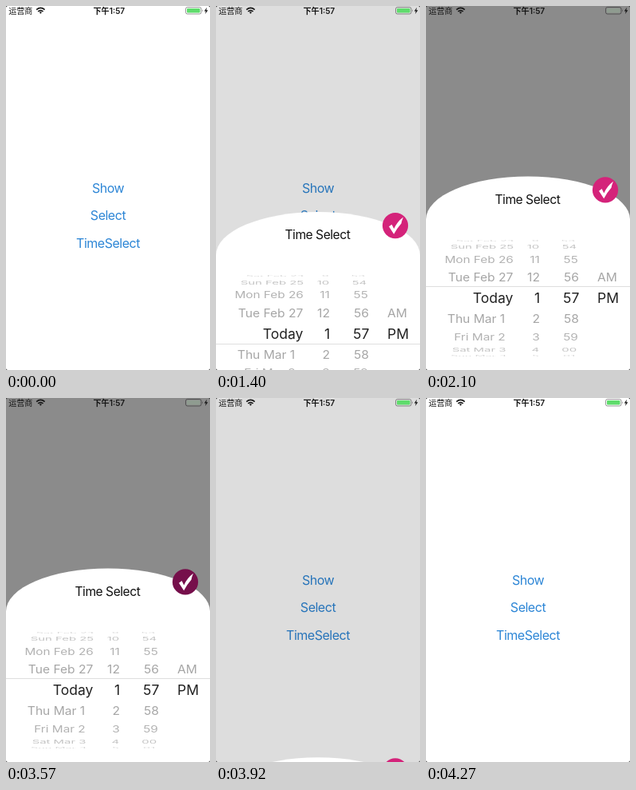
Write an HTML page that moves like this. It is 256 by 456 pixels and loops after 4.83 s.

```html
<!DOCTYPE html>
<html lang="zh">
<head>
<meta charset="utf-8">
<title>Time picker sheet</title>
<style>
  html, body { margin: 0; width: 100%; height: 100%; overflow: hidden; background: #fff; }
  svg { display: block; width: 100%; height: 100%; }
  text { font-family: Inter, Roboto, sans-serif; }
  .link { font-size: 16px; letter-spacing: -0.03em; fill: #2d86d6; text-anchor: middle; }
  .title { font-size: 15.6px; letter-spacing: -0.03em; fill: #111; text-anchor: middle; }
  .status { font: 400 10.1px Inter, "Noto Sans CJK SC", "Noto Sans CJK", sans-serif; fill: #161616; }
  .clock { font-weight: 600; text-anchor: middle; }
  .row { font-size: 15.7px; fill: #a2a2a2; text-anchor: end; }
  .row.now { font-size: 17.5px; fill: #222; }
</style>
</head>
<body>
<svg viewBox="0 0 256 456">
  <rect width="256" height="456" fill="#fff"/>
  <text class="link" x="128" y="233.5">Show</text>
  <text class="link" x="128" y="268">Select</text>
  <text class="link" x="128" y="303" id="open">TimeSelect</text>
  <rect id="dim" width="256" height="456"/>

  <g id="sheet">
    <path d="M0 267.3A128 53.9 0 0 1 256 267.3V456H0Z" fill="#fff"/>
    <text class="title" x="127.4" y="247.8">Time Select</text>
    <g id="wheel"></g>
    <path id="lineTop" d="M0 351.5H256" stroke="#dedede"/>
    <path id="lineLow" d="M0 378.9H256" stroke="#dedede"/>
    <circle id="done" cx="225" cy="230.4" r="16.1"/>
    <path d="M217 231.7L220.6 229L223.3 234.4Q227.4 225.4 235 219.8Q233 224.4 232.5 227.8Q227.4 233.4 223.2 241.2Z" fill="#fff"/>
  </g>

  <text class="status" x="3.2" y="9.5">运营商</text>
  <text class="status clock" x="129.3" y="9.5">下午1:57</text>
  <g fill="none" stroke="#161616" stroke-width="1.7">
    <path d="M38.2 4.6Q43.4 0.2 48.6 4.6"/>
    <path d="M40.2 6.9Q43.4 4.2 46.6 6.9"/>
    <path d="M41.8 7.9Q43.4 6.7 45 7.9L43.4 9.8Z" fill="#161616" stroke="none"/>
  </g>
  <rect x="225.5" y="1.5" width="19.5" height="8.5" rx="2.2" fill="none" stroke="#000" stroke-opacity="0.45" stroke-width="0.9"/>
  <rect id="charge" x="227" y="3" width="16.5" height="5.5" rx="1"/>
  <path d="M246.2 4.3Q247.6 5.7 246.2 7.2Z" fill-opacity="0.5"/>
  <path d="M252 1.8L248.8 6.4H250.8L250 10L253.4 5.2H251.3Z" fill="#161616"/>
  <path d="M0 0H2.5Q0 0 0 2.5ZM256 0V2.5Q256 0 253.5 0ZM0 456V453.5Q0 456 2.5 456ZM256 456H253.5Q256 456 256 453.5Z" fill="#333"/>
</svg>

<script>
const LOOP = 4830, STEP = 70;
const SHOW = 1230, HIDE = 3610;      // sheet starts to rise / fall
const PRESS = 980, RELEASE = 1120;   // TimeSelect button
const TAP = 3570, TAP_END = 3640;    // check button
const TRAVEL = 242.5, DIM = 0.455, FADE = 482, OMEGA = 18.26;

const $ = id => document.getElementById(id);
const set = (id, attrs) => {
  for (const key in attrs) $(id).setAttribute(key, attrs[key]);
};
const clamp = v => Math.min(1, Math.max(0, v));
const smooth = v => { v = clamp(v); return v * v * (3 - 2 * v); };

// Critically damped spring from 0 to 1.
const spring = ms => {
  const s = OMEGA * Math.max(0, ms) / 1000;
  return 1 - (1 + s) * Math.exp(-s);
};

// Rows lie on a cylinder seen from the front.
function buildWheel() {
  const dates = ["Sat Feb 24", "Sun Feb 25", "Mon Feb 26", "Tue Feb 27", "Today",
    "Thu Mar 1", "Fri Mar 2", "Sat Mar 3", "Sun Mar 4"];
  const angle = 21.1 * Math.PI / 180, radius = 72.3;
  let rows = "";
  dates.forEach((date, i) => {
    const k = i - 4, cos = Math.cos(k * angle);
    const y = 366.1 + radius * Math.sin(k * angle);
    const sx = 1 - 0.09 * (1 - cos);
    const hour = (i + 8) % 12 + 1;
    const minute = String((53 + i) % 60).padStart(2, "0");
    const base = k ? 5.7 : 6.3;
    const cell = (x, label) => `<text x="${x}" y="${base}">${label}</text>`;
    let cells = cell(k > 0 ? 99 : 109.3, date) + cell(143, hour) + cell(192.3, minute);
    if (k === -1) cells += cell(240.5, "AM");
    if (k === 0) cells += cell(242, "PM");
    rows += `<g class="row${k ? "" : " now"}" opacity="${0.35 + 0.65 * cos}"
      transform="translate(128 ${y}) scale(${sx} ${sx * cos}) translate(-128 0)">${cells}</g>`;
  });
  $("wheel").innerHTML = rows;
}

function draw(t) {
  const shown = t < HIDE ? spring(t - SHOW) : 1 - spring(t - HIDE);
  const dim = smooth((t - SHOW) / FADE) - smooth((t - HIDE) / FADE);
  const drop = TRAVEL * (1 - shown);
  const settled = drop < 0.5;
  const muted = t >= 1750 && t < TAP_END;

  let alpha = 1;
  if (t >= PRESS) alpha = t < RELEASE ? 0.2 : 0.2 + 0.8 * smooth((t - RELEASE + STEP) / 300);

  set("open", { opacity: alpha });
  set("dim", { opacity: DIM * dim });
  set("sheet", {
    transform: `translate(0 ${drop})`,
    visibility: drop > TRAVEL - 0.5 ? "hidden" : "visible"
  });
  // The hairlines fall on a pixel row one at a time.
  set("lineTop", { opacity: settled ? 1 : 0 });
  set("lineLow", { opacity: settled ? 0 : 1 });
  set("done", { fill: t >= TAP && t < TAP_END ? "#760f4b" : "#d4237a" });
  set("charge", { fill: muted ? "#8f9c90" : "#5fdc6c" });
}

buildWheel();
const start = performance.now();
function tick() {
  const t = (performance.now() - start) % LOOP;
  draw(Math.floor((t + 4) / STEP) * STEP % LOOP);
  requestAnimationFrame(tick);
}
tick();
</script>
</body>
</html>
```
